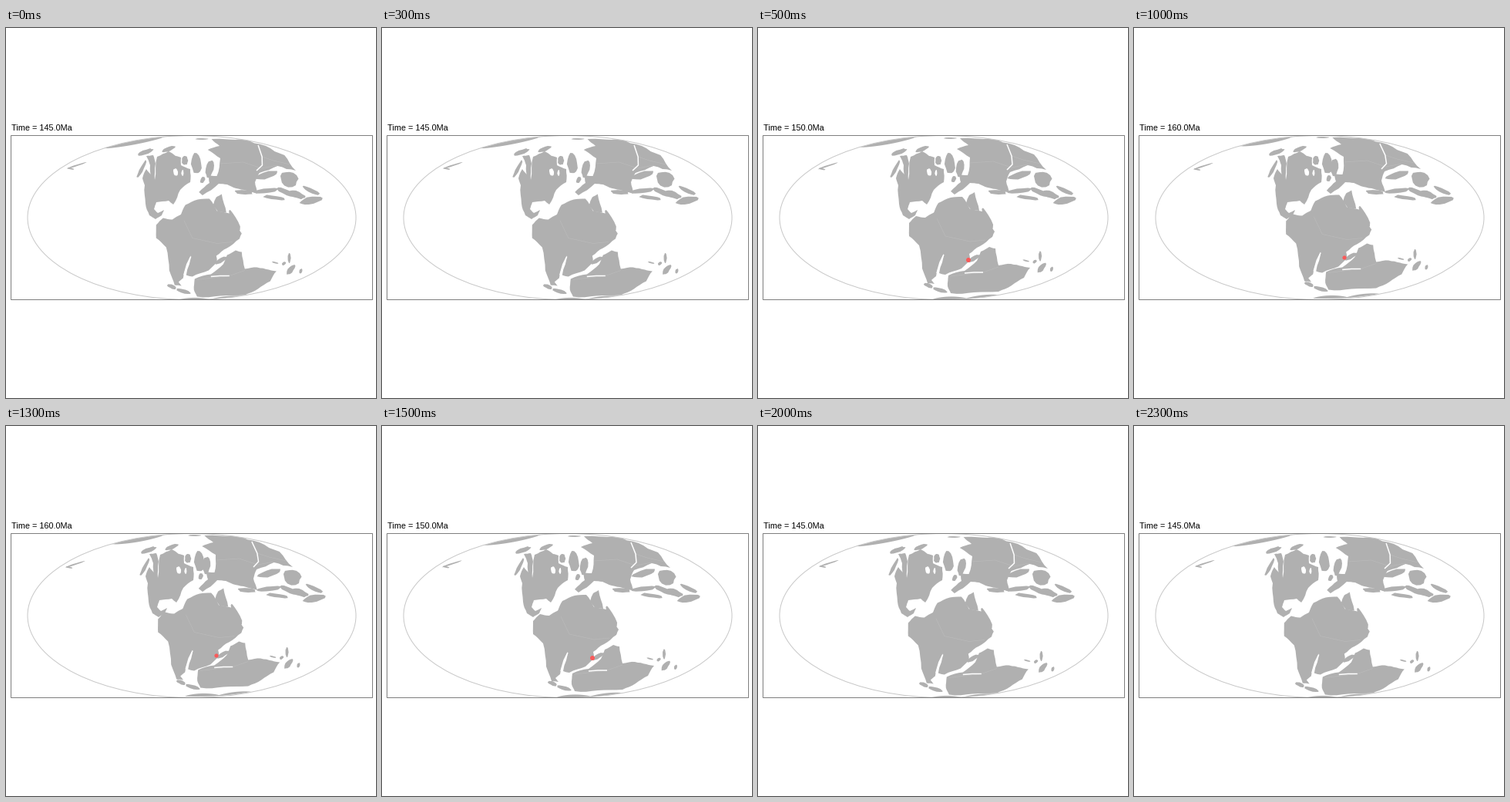
Write a matplotlib script that moves like this. It is 480 by 480 pixels and loops after 2.5 s.

```python
import numpy as np
import matplotlib.pyplot as plt
from matplotlib.animation import FuncAnimation
from matplotlib.collections import LineCollection, PolyCollection
from matplotlib.patches import Circle, Ellipse, Rectangle

SIZE, DPI = 480, 100
PX = 72 / DPI
AGES = [145, 150, 160, 150, 145]
LAND, SEAM, RED = "#b0b0b0", "#bababa", "#f95a5a"
CX, CY, RX, RY = 241, 246, 213, 106.5
rng = np.random.default_rng(7)


def pts(*xy):
    return np.array(xy, float).reshape(-1, 2)


def coast(*xy, rough=0.05):
    """Closed outline through key points, broken up by midpoint displacement."""
    p = pts(*xy)
    for _ in range(2):
        step = np.roll(p, -1, axis=0) - p
        normal = step[:, ::-1] * [1, -1]
        mid = p + step / 2 + normal * rng.uniform(-rough, rough, (len(p), 1))
        p = np.stack([p, mid], axis=1).reshape(-1, 2)
    return p


def blob(x, y, w, h, turn=0, n=14):
    """Rough ellipse, turned clockwise by some degrees."""
    a = np.linspace(0, 2 * np.pi, n, endpoint=False)
    r = rng.uniform(0.85, 1.1, n) / 2
    u, v = w * r * np.cos(a), h * r * np.sin(a)
    c, s = np.cos(np.radians(turn)), np.sin(np.radians(turn))
    return np.column_stack([x + u * c - v * s, y + u * s + v * c])


def rim(x0, x1, depth, side):
    """Sliver hugging the globe's edge; side -1 is north, 1 is south."""
    x = np.linspace(x0, x1, 16)
    edge = CY + side * RY * np.sqrt(1 - ((x - CX) / RX) ** 2)
    inner = edge - side * depth * np.sin(np.linspace(0, np.pi, 16)) ** 0.7
    return np.column_stack([np.r_[x, x[::-1]], np.r_[edge, inner[::-1]]])


# Plates as they stand at 150 Ma
LANDS = {
    "america": [
        coast(198, 167, 213, 160, 222, 166, 229, 168, 229, 178, 241, 183,
              241, 200, 228, 210, 219, 229, 213, 224, 197, 226, 194, 235,
              199, 240, 207, 236, 204, 243, 196, 248, 188, 243, 183, 228,
              182, 204, 179, 195, 184, 183, 190, 190, 195, 197),
        coast(184, 166, 193, 165, 196, 176, 195, 198, 190, 197, 189, 178),
        blob(178, 183, 26, 5, -62),
        blob(183, 161, 22, 6, -20),
        blob(213, 157, 18, 6, -22),
        blob(249, 176, 13, 27, -5),
        blob(234, 172, 8, 12),
    ],
    "eurasia": [
        coast(262, 143, 303, 143, 333, 152, 358, 164, 374, 184, 350, 178,
              327, 187, 322, 199, 326, 214, 312, 210, 298, 207, 286, 202,
              275, 201, 255, 216, 250, 212, 263, 200, 261, 190, 272, 191,
              275, 168, 258, 157, 273, 152),
        blob(262, 182, 10, 23, 8),
        blob(254, 196, 6, 9, 20),
        blob(249, 143, 17, 2),
    ],
    "tethys": [
        blob(340, 191, 32, 9, -14),
        blob(369, 196, 24, 20, 20),
        blob(340, 211, 32, 6, -6),
        blob(365, 213, 26, 7, 25),
        blob(350, 220, 30, 5, 8),
        blob(379, 216, 23, 9, 20),
        blob(397, 224, 30, 10, -12),
        blob(398, 211, 24, 6, 26),
        blob(310, 213, 24, 6, 5),
    ],
    "gondwana": [
        coast(228, 240, 234, 227, 250, 220, 265, 219, 275, 235, 294, 239,
              301, 254, 307, 264, 304, 271, 288, 283, 274, 293, 275, 301,
              264, 312, 243, 320, 235, 318, 241, 290, 242, 270, 231, 247),
        coast(229, 239, 217, 246, 205, 244, 196, 253, 196, 270, 209, 282,
              213, 312, 220, 331, 229, 332, 225, 327, 231, 322, 236, 305,
              243, 288, 244, 270),
        coast(274, 217, 281, 213, 287, 237, 276, 236, 270, 227),
        blob(298, 247, 32, 6, 62),
        blob(280, 299, 18, 6, -30),
    ],
    "austral": [
        coast(247, 321, 268, 315, 284, 302, 289, 290, 300, 284, 308, 286,
              312, 308, 328, 306, 343, 309, 353, 311, 345, 324, 329, 334,
              312, 342, 280, 343, 250, 344, 246, 335),
    ],
    "south": [
        blob(221, 334, 13, 5, 25),
        blob(236, 340, 20, 5, 15),
        rim(226, 272, 4, 1),
        rim(268, 312, 3, 1),
    ],
    "islands": [
        blob(348, 302, 9, 2, 15),
        blob(359, 303, 6, 4, -40),
        blob(366, 296, 4, 13),
        blob(368, 311, 16, 7, -50),
        blob(381, 313, 4, 7, 20),
    ],
    "pacific": [blob(90, 179, 27, 2, -18), blob(83, 183, 9, 2, 10)],
}

# Shift right, shift down and lean of the north, per step back in time
DRIFT = {
    "america": (2, 0, 0),
    "eurasia": (0, -1, -4.5),
    "tethys": (2, 0, 0),
    "gondwana": (1.2, -2.5, 0),
    "austral": (2.2, -4.5, 0),
    "south": (6, -1.5, 0),
    "islands": (-1.5, -2.5, 0),
    "pacific": (-1, 0.5, 0),
}

LAKES = [("america", blob(222, 187, 6, 10, -10)),
         ("america", blob(231, 188, 3, 8)),
         ("eurasia", blob(267, 169, 4, 8))]
CRACKS = [("eurasia", pts(323, 151, 329, 166, 330, 177, 323, 184)),
          ("gondwana", pts(241, 294, 236, 304, 232, 318)),
          ("austral", pts(268, 318, 280, 317, 292, 317))]
SEAMS = [("eurasia", pts(275, 175, 305, 173, 329, 181, 350, 177)),
         ("eurasia", pts(329, 166, 344, 171, 366, 176)),
         ("gondwana", pts(232, 247, 243, 270, 275, 277, 295, 275)),
         ("austral", pts(250, 322, 292, 317, 312, 310))]


def place(items, age):
    """Carry each shape along with its plate."""
    step = np.sign(age - 150)
    out = []
    for plate, p in items:
        dx, dy, lean = DRIFT[plate]
        x, y = p.T
        shift = dx + lean * (215 - y) / 70
        out.append(np.column_stack([x + step * shift, y + step * dy]))
    return out


fig = plt.figure(figsize=(SIZE / DPI, SIZE / DPI), dpi=DPI, facecolor="white")
ax = fig.add_axes([0, 0, 1, 1])
ax.set(xlim=(0, SIZE), ylim=(SIZE, 0))
ax.axis("off")

globe = Ellipse((CX, CY), 2 * RX, 2 * RY, fc="none", ec="#c8c8c8", lw=PX,
                zorder=5)
ax.add_patch(globe)
ax.add_patch(Rectangle((6.5, 139.5), 469, 213, fc="none", ec="#7f7f7f",
                       lw=PX, snap=False, zorder=6))
label = ax.text(6.9, 133, "", family="Liberation Sans", size=10.9 * PX,
                color="black", va="baseline")


def build_map(age):
    lands = [(plate, p) for plate, group in LANDS.items() for p in group]
    arctic = rim(132 + np.sign(age - 150) * 5, 206, 5, -1)
    layers = [
        PolyCollection(place(lands, age) + [arctic], fc=LAND, ec="none",
                       zorder=1),
        PolyCollection(place(LAKES, age), fc="white", ec="none", zorder=2),
        LineCollection(place(SEAMS, age), colors=SEAM, lw=0.7 * PX, zorder=2),
        LineCollection(place(CRACKS, age), colors="white", lw=1.5 * PX,
                       zorder=3),
    ]
    for layer in layers:
        ax.add_collection(layer, autolim=False)
        layer.set_clip_path(globe)
    return layers


maps = {age: build_map(age) for age in sorted(set(AGES))}
for age, y, r in [(150, 301, 3), (160, 298, 2.6)]:
    maps[age].append(ax.add_patch(Circle((273, y), r, fc=RED, ec="none",
                                         zorder=7)))


def update(i):
    now = AGES[i]
    label.set_text(f"Time = {now:.1f}Ma")
    for age, layers in maps.items():
        for layer in layers:
            layer.set_visible(age == now)
    return []


anim = FuncAnimation(fig, update, frames=len(AGES), interval=500,
                     repeat=True, repeat_delay=0)
plt.show()
```
